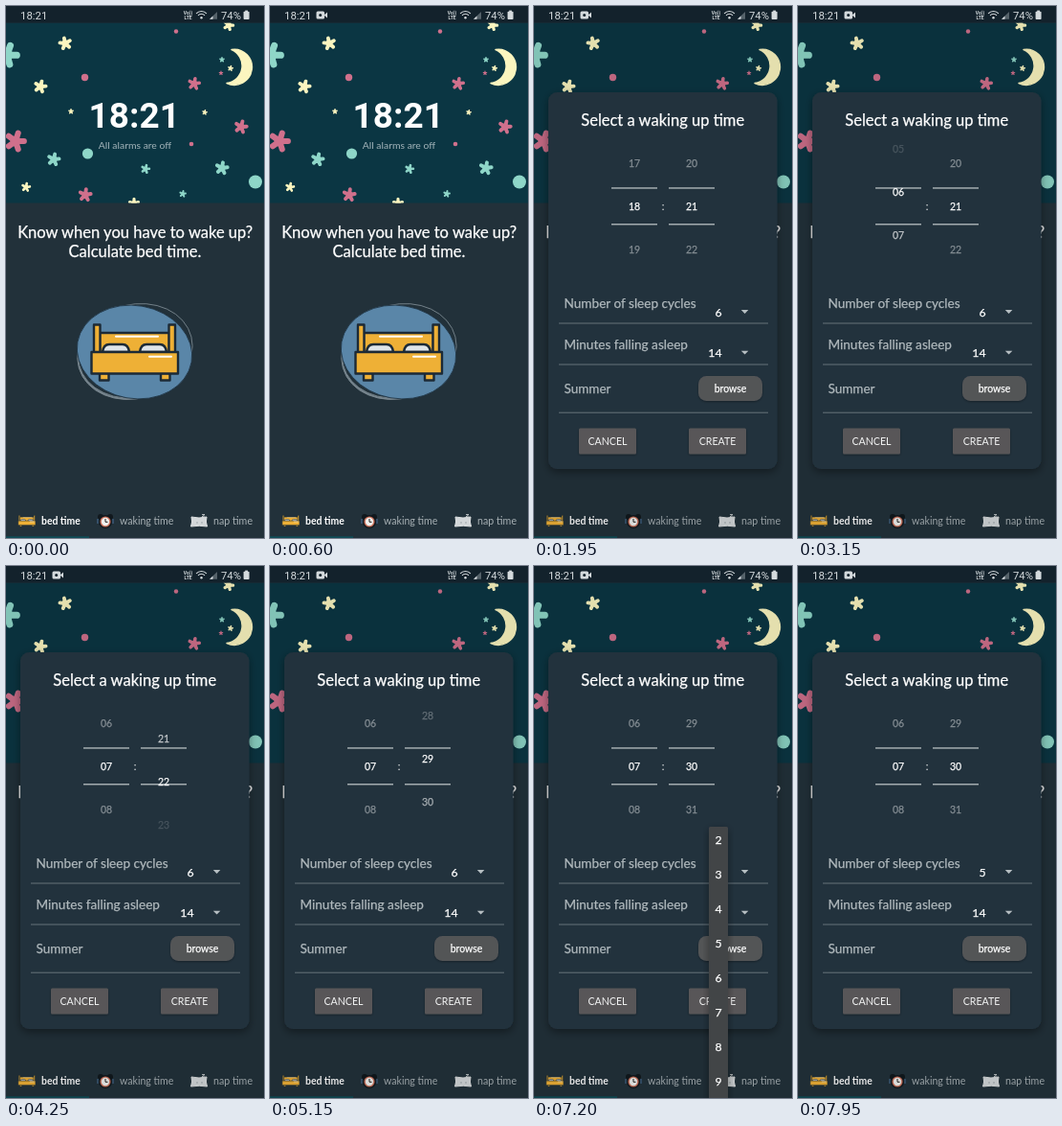
These frames come from a looping animation (270x555 px, 8 s). An HTML page:

```html
<!DOCTYPE html>
<html lang="en">
<head>
<meta charset="utf-8">
<title>Bed time calculator</title>
<style>
  html, body { margin: 0; width: 100%; height: 100%; overflow: hidden; background: #22313a; }
  svg { display: block; width: 100vw; height: 100vh; font-family: Lato, Carlito, sans-serif; }
  .sys { font-family: Roboto, sans-serif; }
  .mid { text-anchor: middle; }
  .firm { stroke: currentColor; stroke-width: .25px; color: #fff; }
  .soft { color: #b0b9bd; }
</style>
</head>
<body>
<svg id="stage" viewBox="0 0 270 555" preserveAspectRatio="none"></svg>
<script>
const LOOP = 8000;
const PAGE = '#22313a', YELLOW = '#fbf5bf', TEAL = '#8ed6c8', PINK = '#d0708c', INK = '#1c2a36', GOLD = '#eeb036';

const rect = (x, y, w, h, fill, extra = '') =>
  `<rect x="${x}" y="${y}" width="${w}" height="${h}" fill="${fill}" ${extra}/>`;
const dot = (x, y, r, fill) => `<circle cx="${x}" cy="${y}" r="${r}" fill="${fill}"/>`;
const text = (x, y, size, str, fill = '#fff', cls = '', extra = '') =>
  `<text x="${x}" y="${y}" font-size="${size}" fill="${fill}" class="${cls}" ${extra}>${str}</text>`;
const path = (d, fill, extra = '') => `<path d="${d}" fill="${fill}" ${extra}/>`;

// Five fat rounded arms around a centre.
function star(x, y, r, turn, color) {
  let d = '';
  for (let i = 0; i < 5; i++) {
    const a = (turn + i * 72 - 90) * Math.PI / 180;
    d += `M${x} ${y}l${(r * 0.74 * Math.cos(a)).toFixed(2)} ${(r * 0.74 * Math.sin(a)).toFixed(2)}`;
  }
  return path(d, 'none', `stroke="${color}" stroke-width="${r * 0.5}" stroke-linecap="round"`) + dot(x, y, r * 0.46, color);
}

function sky() {
  const stars = [
    [1, 51, 14, 20, TEAL], [62, 39, 7.6, -12, YELLOW], [36, 84, 7.6, 15, YELLOW], [68, 110, 3, 0, YELLOW],
    [10, 141, 12, 18, PINK], [50, 160, 7.6, 12, TEAL], [21, 189, 5.3, 10, YELLOW], [83, 197, 7.8, 8, PINK],
    [134, 206, 6.3, 0, YELLOW], [146, 170, 5.3, 15, TEAL], [208, 111, 3, 10, YELLOW], [185, 196, 4, 10, TEAL],
    [197, 81, 7.2, 10, PINK], [233, 20, 6.3, 20, YELLOW], [226, 56, 3, 0, TEAL],
    [235, 65, 3.2, 12, YELLOW], [225, 70, 2.4, 0, PINK], [246, 126, 7.8, 15, PINK], [226, 169, 7.8, 10, TEAL]
  ];
  const dots = [[82.5, 74.5, 3.7, PINK], [85.5, 154, 5.6, TEAL], [194, 144, 2.3, PINK],
    [178, 26.5, 2.2, PINK], [261, 183.5, 7, TEAL]];
  return rect(0, 17.5, 270, 188, '#0b3643') +
    `<g clip-path="url(#skyClip)">${stars.map(s => star(...s)).join('')}${dots.map(d => dot(...d)).join('')}` +
    path('M236 45.5 A18.5 18.5 0 1 1 231 80.5 A18.3 18.3 0 0 0 236 45.5Z', YELLOW,
      `stroke="${YELLOW}" stroke-width="1.5" stroke-linejoin="round"`) + '</g>' +
    text(134.3, 126.5, 37, '18:21', '#fff', 'sys mid', 'font-weight="700"') +
    text(135, 148.5, 10.4, 'All alarms are off', '#a3b4ba', 'mid');
}

function bed() {
  const line = `stroke="${INK}" stroke-width="2.4" stroke-linejoin="round"`;
  const pillow = x => path(`M${x} 361 q1 -8 7 -8 h14 q6 0 7 8Z`, '#dfe5e9', line);
  return rect(98, 341, 73, 22, GOLD, line) +
    rect(92, 332.5, 6.5, 31, GOLD, line) + rect(170.5, 332.5, 6.5, 31, GOLD, line) +
    pillow(101) + pillow(140) +
    rect(98, 383, 9.5, 7.5, GOLD, line) + rect(162, 383, 9.5, 7.5, GOLD, line) +
    rect(89.5, 361, 90.5, 22.5, GOLD, line) +
    rect(114, 343.7, 46, 2, '#fff', 'rx="1"') + rect(149, 364.7, 25, 2, '#fff', 'rx="1"');
}

function badge() {
  const oval = (turn, fill, stroke, shift = 0) =>
    `<ellipse cx="${134.5 + shift}" cy="${361 - shift}" rx="60.5" ry="48.5" fill="${fill}" stroke="${stroke}" stroke-width=".8" transform="rotate(${turn} 134.5 361)"/>`;
  return oval(-16, '#72808a', '#7e8b93') + oval(-14, PAGE, '#7e8b93', 1) + oval(10, '#5a86a8', '#1f3342') + bed();
}

function nav() {
  const grey = '#a8b1b5';
  const clock = dot(99, 533, 3, '#11181d') + dot(109, 533, 3, '#11181d') + dot(104, 538, 7, '#11181d') +
    dot(104, 538, 5.6, '#c9705a') + dot(104, 538, 4.2, '#f1f1ee') +
    path('M104 535 V538.3 H106.5', 'none', 'stroke="#222" stroke-width="1"') +
    rect(95, 535, 2, 5, '#35506a') + rect(111, 535, 2, 5, '#35506a');
  const pillow = path('M194 533 q8 2 16 0 q-1.5 5 .5 10 q-8 -1.5 -17 0 q2 -5 .5 -10Z', '#d3d7d9',
      'stroke="#dfe2e3" stroke-width="1" stroke-linejoin="round"') +
    path('M199 539 h2 M204 539 h2', 'none', 'stroke="#7b8489" stroke-width=".6"') +
    path('M205 530.5 h3 l-3 2.5 h3', 'none', 'stroke="#d5d9da" stroke-width=".8"');
  return `<g transform="translate(-5.1 464.9) scale(.2)">${bed()}</g>` + clock + pillow +
    text(37, 541, 10.4, 'bed time', '#fff', '', 'font-weight="700"') +
    text(119, 541, 10.6, 'waking time', grey) + text(217, 541, 10.7, 'nap time', grey) +
    rect(0, 553.3, 87, 1.7, '#0e4c57');
}

function statusBar() {
  const ink = '#d4dadd';
  const arc = r => path(`M${204.5 - r * 0.75} ${13 - r * 0.7} A${r} ${r} 0 0 1 ${204.5 + r * 0.75} ${13 - r * 0.7}`,
    'none', `stroke="${ink}" stroke-width="1.1"`);
  return rect(0, 0, 270, 17.5, '#13222c') +
    text(15, 13.7, 11.4, '18:21', ink, 'sys') +
    `<g id="rec">${rect(48.5, 5.5, 8.5, 8, ink, 'rx="1.5"')}${path('M56.5 9.5 l3.5 -3 v6Z', ink)}${dot(52.7, 9.5, 1.5, '#13222c')}</g>` +
    text(190.5, 9, 5, 'Vo))', ink, 'sys mid', 'font-weight="700"') +
    text(190.5, 14, 5, 'LTE', ink, 'sys mid', 'font-weight="700"') +
    arc(7.2) + arc(4.6) + dot(204.5, 12.3, 1.2, ink) +
    path('M213 13.8 L221 6 V13.8Z', '#55626a') + path('M213 13.8 L216.5 10.4 V13.8Z', ink) +
    text(225, 13.7, 11.3, '74%', ink, 'sys') +
    rect(248.6, 5.8, 6, 8.2, ink, 'rx=".8"') + rect(250.2, 4.6, 2.8, 1.5, ink);
}

function dialog() {
  const label = '#b0b9bd', soft = 'firm soft';
  const rule = y => rect(26, y, 219, 1, '#66737a');
  const caret = y => path(`M216.8 ${y} h7.6 l-3.8 3.9Z`, '#b6bec2');
  const bars = x => rect(x, 189.2, 48, 1.5, '#a3acb0') + rect(x, 227, 48, 1.5, '#a3acb0');
  const button = (x, str) => rect(x, 440.5, 60, 27, '#595759', 'rx="1.5" filter="url(#lift)"') +
    text(x + 30, 458, 10.6, str, '#f2f3f3', 'mid');
  return rect(15, 90, 239.5, 393, '#21323c', 'rx="9" filter="url(#shadow)"') +
    text(134.7, 125, 16.5, 'Select a waking up time', '#fff', 'mid firm') +
    bars(81) + bars(141) + text(135, 213, 10.5, ':', '#fff', 'mid') +
    '<g id="hours" clip-path="url(#wheelClip)"></g><g id="minutes" clip-path="url(#wheelClip)"></g>' +
    text(31.5, 315, 13.6, 'Number of sleep cycles', label, soft) +
    text(193, 323.8, 12.3, '6', '#fff', 'mid firm', 'id="cycles"') + caret(317) + rule(330.5) +
    text(31.5, 357.7, 13.6, 'Minutes falling asleep', label, soft) +
    text(189.5, 366, 12.3, '14', '#fff', 'mid firm') + caret(359.7) + rule(373.5) +
    text(31.5, 404, 13.5, 'Summer', label, soft) +
    rect(172, 386, 67, 26, '#535457', 'rx="8.5" filter="url(#lift)"') +
    text(205.5, 402.7, 10.5, 'browse', '#fff', 'mid firm') + rule(423.7) +
    button(47, 'CANCEL') + button(162, 'CREATE');
}

function menu() {
  let items = '';
  for (let n = 2; n <= 9; n++) items += text(193, 289.8 + (n - 2) * 36, 12.3, n, '#fff', 'mid firm');
  return rect(183, 272, 20, 290, '#434446', 'rx="1.5" filter="url(#shadow)"') +
    '<rect id="press" x="183" y="375.5" width="20" height="36" fill="#fff"/>' + items +
    '<rect id="thumb" x="199.8" y="308" width="3" height="247" fill="#858789"/>';
}

const stage = document.getElementById('stage');
stage.innerHTML = `<defs>
  <clipPath id="skyClip"><rect y="17.5" width="270" height="188"/></clipPath>
  <clipPath id="wheelClip"><rect x="70" y="142" width="130" height="135"/></clipPath>
  <filter id="shadow" x="-30%" y="-10%" width="160%" height="125%"><feDropShadow dx="0" dy="3" stdDeviation="4" flood-opacity=".4"/></filter>
  <filter id="lift" x="-10%" y="-20%" width="120%" height="150%"><feDropShadow dx="0" dy="1" stdDeviation="1" flood-opacity=".35"/></filter>
</defs>` +
  rect(0, 0, 270, 555, PAGE) + sky() +
  text(135.2, 242, 16.55, 'Know when you have to wake up?', '#fff', 'mid firm') +
  text(135, 261.5, 16.55, 'Calculate bed time.', '#fff', 'mid firm') +
  badge() + nav() + rect(0, 17.5, 270, 537.5, '#000', 'id="dim"') + statusBar() +
  `<g id="dialog">${dialog()}</g><g id="menu">${menu()}</g>`;

const el = id => document.getElementById(id);
const parts = Object.fromEntries(['rec', 'dim', 'dialog', 'menu', 'press', 'thumb', 'cycles'].map(id => [id, el(id)]));
const clamp = v => Math.max(0, Math.min(1, v));
const ramp = (t, from, to) => clamp((t - from) / (to - from));
const easeOut = p => 1 - (1 - p) ** 2;

// Smooth curve through [time, value] keys, at rest at both ends.
function track(t, keys) {
  const last = keys.length - 1;
  if (t <= keys[0][0]) return keys[0][1];
  if (t >= keys[last][0]) return keys[last][1];
  const i = keys.findIndex(k => k[0] > t) - 1;
  const slope = j => j === 0 || j === last ? 0
    : (keys[j + 1][1] - keys[j - 1][1]) / (keys[j + 1][0] - keys[j - 1][0]);
  const [t0, a] = keys[i], [t1, b] = keys[i + 1];
  const d = t1 - t0, p = (t - t0) / d, q = 1 - p;
  return a * q * q * (1 + 2 * p) + b * p * p * (3 - 2 * p) +
    d * (slope(i) * p * q * q - slope(i + 1) * p * p * q);
}

function makeWheel(id, x, count) {
  const group = el(id);
  group.innerHTML = text(x, 0, 10.5, '', '#fff', 'mid firm').repeat(5);
  return pos => [...group.children].forEach((item, i) => {
    const n = Math.round(pos) + i - 2;
    const shift = (n - pos) * 45;
    item.textContent = String(n % count).padStart(2, '0');
    item.setAttribute('y', 213.2 + shift);
    item.setAttribute('opacity', clamp(1 - (Math.abs(shift) - 15) * 0.0185));
  });
}
const setHours = makeWheel('hours', 105, 24);
const setMinutes = makeWheel('minutes', 165, 60);
const HOURS = [[2100, 18], [2400, 20], [2750, 26], [3150, 30.33], [3450, 30.8], [3850, 31]];
const MINUTES = [[4100, 21], [4500, 24], [4850, 27.5], [5150, 29.19], [5700, 30]];

function draw(t) {
  parts.rec.style.opacity = t >= 300 ? 1 : 0;
  parts.dialog.style.opacity = easeOut(ramp(t, 650, 985));
  parts.dim.style.opacity = 0.09 * ramp(t, 650, 1000);
  setHours(track(t, HOURS));
  setMinutes(track(t, MINUTES));
  parts.menu.style.opacity = ramp(t, 6050, 6250) * (1 - ramp(t, 7500, 7700));
  parts.thumb.style.opacity = 1 - ramp(t, 6600, 6850);
  parts.press.style.opacity = 0.15 * ramp(t, 7300, 7450);
  parts.cycles.textContent = t >= 7500 ? '5' : '6';
}

function tick() {
  draw(performance.now() % LOOP);
  requestAnimationFrame(tick);
}
tick();
</script>
</body>
</html>
```
